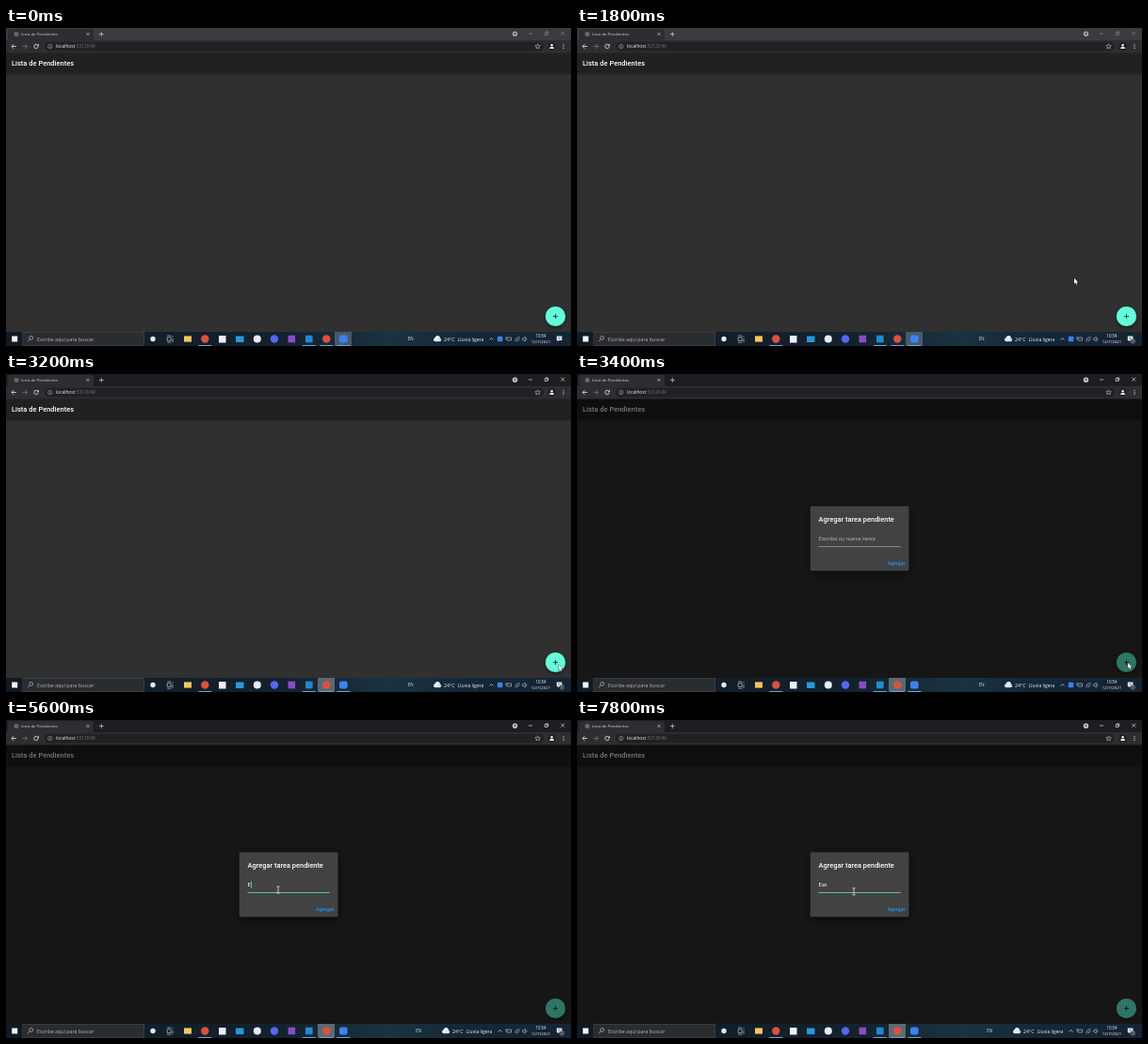
These frames come from a looping animation (600 by 338 pixels, 8000 ms). An HTML page with a canvas:

```html
<!DOCTYPE html>
<html lang="es">
<head>
<meta charset="utf-8">
<title>Lista de Pendientes</title>
<style>
html, body { margin: 0; width: 100%; height: 100%; overflow: hidden; background: #303030; }
canvas { display: block; width: 600px; height: 338px; }
</style>
</head>
<body>
<canvas id="stage"></canvas>
<script>
const W = 600, H = 338, LOOP = 8000, TICK = 200;
const UI = '"Open Sans", "Noto Sans", sans-serif';
const APP = 'Roboto, Arial, sans-serif';
const TEAL = '#64ffda';

const canvas = document.getElementById('stage');
const ctx = canvas.getContext('2d');
const dpr = window.devicePixelRatio || 1;
canvas.width = W * dpr;
canvas.height = H * dpr;

function rect(x, y, w, h, color) {
  ctx.fillStyle = color;
  ctx.fillRect(x, y, w, h);
}

function round(x, y, w, h, r, color) {
  ctx.fillStyle = color;
  ctx.beginPath();
  ctx.roundRect(x, y, w, h, r);
  ctx.fill();
}

function disc(x, y, r, color) {
  ctx.fillStyle = color;
  ctx.beginPath();
  ctx.arc(x, y, r, 0, 7);
  ctx.fill();
}

function ring(x, y, r, color, width = 0.7, from = 0, to = 7) {
  ctx.strokeStyle = color;
  ctx.lineWidth = width;
  ctx.beginPath();
  ctx.arc(x, y, r, from, to);
  ctx.stroke();
}

function path(d, color, width = 0.8) {
  const p = new Path2D(d);
  if (width) {
    ctx.strokeStyle = color;
    ctx.lineWidth = width;
    ctx.stroke(p);
  } else {
    ctx.fillStyle = color;
    ctx.fill(p);
  }
}

function text(s, x, y, size, color, font = UI, weight = 400, align = 'left') {
  ctx.font = `${weight} ${size}px ${font}`;
  ctx.textAlign = align;
  ctx.fillStyle = color;
  ctx.fillText(s, x, y);
}

function at(x, y, draw) {
  ctx.save();
  ctx.translate(x, y);
  draw();
  ctx.restore();
}

function drawBrowser(focused) {
  const bar = '#2e2e32';
  rect(0, 0, W, 14, focused ? '#1e1e22' : '#3b3c41');
  round(2, 1, 91, 14, [3, 3, 0, 0], bar);
  rect(0, 13, W, 13.5, bar);

  disc(11, 6.5, 2.5, '#66686c');
  text('Lista de Pendientes', 16, 8, 4.3, '#d4d5d8');
  path('M85.5 5l3 3m0-3l-3 3', '#d8d8d8', 0.6);
  path('M98.8 6.5h5M101.3 4v5', '#d0d0d0', 0.7);

  disc(540.5, 6.3, 2.7, focused ? '#c4c6c9' : '#a4a6a9');
  path('M539.2 5.6h2.6l-1.3 1.7z', '#242428', 0);
  const ctl = focused ? '#f0f0f0' : '#85868a';
  path('M555 6h4M572.2 4.8h2.7v2.7h-2.7zM573 4.6V4h2.7v2.7h-.7M589.3 3.8l3.8 3.8m0-3.8l-3.8 3.8', ctl, 0.65);

  path('M11 19.5H6M8.3 17.1L5.9 19.5l2.4 2.4', '#e6e6e8');
  path('M17.5 19.5h5M20.2 17.1l2.4 2.4-2.4 2.4', '#77787c');
  ring(32, 19.5, 2.2, '#e6e6e8', 0.8, 0.2, 5.5);
  path('M34.8 16.8v2.4h-2.4z', '#e6e6e8', 0);

  round(41, 14.7, 530, 9.8, 4.9, '#202124');
  ring(46.8, 19.5, 2.2, '#a5a7ab', 0.6);
  path('M46.8 18.1v.5M46.8 19.1v1.7', '#c4c6c9', 0.6);
  text('localhost', 53, 21.2, 4.85, '#f1f1f2');
  text(':53120/#/', 73.5, 21.2, 4.85, '#74767b');
  path('M564.6 16.8l.75 1.8 2 .15-1.5 1.25.45 1.9-1.7-1-1.7 1 .45-1.9-1.5-1.25 2-.15z', '#d0d1d3', 0.55);
  disc(579.6, 19.5, 4, '#1d1e21');
  disc(579.6, 18.2, 1.3, '#f0f0f0');
  path('M577.2 22.1v-.7q0-1.3 2.4-1.3t2.4 1.3v.7z', '#f0f0f0', 0);
  for (const y of [17.6, 19.5, 21.4]) disc(592, y, 0.55, '#e6e6e8');
}

function drawApp() {
  rect(0, 26, W, 297, '#303030');
  const shade = ctx.createLinearGradient(0, 48, 0, 51);
  shade.addColorStop(0, 'rgba(0,0,0,.3)');
  shade.addColorStop(1, 'rgba(0,0,0,0)');
  rect(0, 48, W, 3, shade);
  rect(0, 26, W, 22, '#212121');
  text('Lista de Pendientes', 6, 40.2, 7.5, '#fff', APP, 500);
  ctx.save();
  ctx.shadowColor = 'rgba(0,0,0,.45)';
  ctx.shadowBlur = 4 * dpr;
  ctx.shadowOffsetY = 1.5 * dpr;
  disc(583.5, 306.5, 10.6, TEAL);
  ctx.restore();
  path('M580.9 306.5h5.2M583.5 303.9v5.2', '#10201c', 0.8);
}

function caretOn(t) {
  if (t < 4800) return false;
  return t < 5000 || (t >= 5400 && t < 6600) || (t >= 7000 && t < 7200);
}

function drawDialog(t) {
  rect(0, 26, W, 297, 'rgba(0,0,0,.54)');
  ctx.save();
  ctx.shadowColor = 'rgba(0,0,0,.6)';
  ctx.shadowBlur = 10 * dpr;
  ctx.shadowOffsetY = 3 * dpr;
  round(247.7, 140.5, 104.8, 68.7, 1.5, '#424242');
  ctx.restore();

  text('Agregar tarea pendiente', 256.5, 156.7, 7.45, '#fff', APP, 500);

  const typed = t < 5400 ? '' : t < 6000 ? 'E' : 'Eat';
  const hint = t < 5400 ? 1 : t < 5600 ? 0.25 : 0;
  if (hint) {
    ctx.globalAlpha = hint;
    text('Escriba su nueva tarea', 256.5, 177.1, 6, '#b0b0b0', APP);
    ctx.globalAlpha = 1;
  }
  text(typed, 256.5, 177.1, 6, '#fff', APP);
  if (caretOn(t)) rect(256.6 + ctx.measureText(typed).width, 171.5, 0.75, 7.6, '#64d8e8');

  const focus = t >= 4600;
  rect(256.5, 183.2, 87.2, focus ? 0.8 : 0.6, focus ? '#64dcd8' : '#b4b4b4');
  text('Agregar', 329.6, 202.8, 5.25, '#2196f3', APP, 500);
}

function drawTaskbar(focused, t) {
  const bg = ctx.createLinearGradient(0, 0, W, 0);
  bg.addColorStop(0, '#101a24');
  bg.addColorStop(0.5, '#14222e');
  bg.addColorStop(0.68, '#1a3341');
  bg.addColorStop(0.8, '#142838');
  bg.addColorStop(1, '#152433');
  rect(0, 323, W, 15, bg);

  rect(6.2, 327.5, 6, 6, '#f4f4f4');
  rect(17.5, 323, 129.5, 15, '#4a4d50');
  rect(18, 323.5, 128.5, 14, '#2a2d30');
  ring(26.7, 329.4, 1.9, '#d5d6d7', 0.6);
  path('M25.3 330.8l-2.2 2.4', '#d5d6d7', 0.6);
  text('Escribe aquí para buscar', 33, 332.5, 5.3, '#b6b8ba');

  rect(focused ? 331 : 349, 323, 18, 15, focused ? '#5b6972' : '#485a69');

  disc(156, 330.5, 2.7, '#e4e8ec');
  path('M171.2 328.8h4v3.6h-4zM171.2 327h4M171.2 334.2h4M177 327v1.4M177 330v4.2', '#d8dde1', 0.6);
  rect(189, 327.4, 8, 6.2, '#f2c75c');
  disc(211.3, 330.5, 4.2, '#db5141');
  rect(226, 327, 7.5, 7.5, '#eef0f1');
  rect(244, 327.5, 8.5, 6.5, '#2a96e0');
  disc(266.8, 330.5, 4, '#e9edef');
  disc(285, 330.5, 4.2, '#5865f2');
  rect(299.5, 326.7, 7.6, 7.6, '#8a4bc4');
  rect(318, 326.7, 7.6, 7.6, '#2488d0');
  disc(340.3, 330.5, 4.2, '#db5141');
  round(354, 326.4, 8.6, 8.2, 2, '#3c82f0');
  for (const x of [211.3, 321.8, 340.3, 358.3]) rect(x - 7, 337, 14, 1, '#6aa9d6');

  const late = t >= 4200;
  at(late ? 9 : 0, 0, () => {
    text('EN', late ? 426.3 : 426.8, 331.6, 4.4, '#dfe3e6');
    disc(456, 331.2, 2, '#dce6ee');
    disc(458.3, 329.7, 2.6, '#eef3f7');
    disc(460.4, 331.4, 1.8, '#cfdbe5');
    rect(456, 331, 4.5, 2.2, '#dce6ee');
    text('24°C', 465, 332.5, 5.3, '#f1f3f4');
    text('Lluvia ligera', 479.7, 332.5, 5, '#f1f3f4');
    path('M513.5 331.5l2-2 2 2', '#e3e7ea', 0.7);
  });
  if (!late) round(521.8, 327.8, 5.6, 5.4, 1.2, '#3c82f0');

  const tray = '#d9dfe3';
  path('M532 329h4.5v3h-4.5zM531 328v3', tray, 0.55);
  path('M541 333.2q0-4.5 4.5-4.5M543 333.2q0-2.5 2.5-2.5', tray, 0.6);
  path('M548.5 329.7h1.2l1.6-1.5v5l-1.6-1.5h-1.2z', tray, 0.5);
  path('M552.4 329.2q1.2 1.4 0 2.8', tray, 0.5);
  text('10:54', 568, 328.6, 4.4, '#f1f3f4', UI, 400, 'center');
  text('12/7/2021', 568, 335.4, 4.3, '#f1f3f4', UI, 400, 'center');
  path('M584.8 327.5h5.6v4.6h-3.2l-1.3 1.5v-1.5h-1.1z', '#eef1f3', 0);
  path('M586 329h3.2M586 330.4h3.2', '#20303d', 0.4);
  if (t >= 200) {
    disc(590.3, 332.9, 2.4, '#26333f');
    ring(590.3, 332.9, 2.4, '#b8c2c9', 0.4);
    text('2', 590.3, 334.3, 3.8, '#fff', UI, 400, 'center');
  }
}

// [time, x, y]
const moves = [
  [1800, 528, 266], [2200, 551, 284], [2800, 586, 308], [3200, 587, 309],
  [3400, 585, 307], [3600, 510, 275], [4000, 308, 192], [4200, 289, 180.5],
  [7600, 289, 180.5], [7800, 294, 182.3], [8000, 294, 182.3]
];

function drawPointer(t) {
  if (t < moves[0][0]) return;
  const i = moves.findIndex(m => m[0] > t);
  const [t0, x0, y0] = moves[i - 1], [t1, x1, y1] = moves[i];
  const k = (t - t0) / (t1 - t0);
  at(x0 + (x1 - x0) * k, y0 + (y1 - y0) * k, () => {
    if (t >= 4200) {
      path('M-1.6-3.5H1.6M0-3.5V3.5M-1.6 3.5H1.6', '#e0e0e0', 0.8);
    } else {
      const arrow = 'M0 0V5.8L1.4 4.6 2.3 6.7 3.3 6.2 2.4 4.3H4.2Z';
      path(arrow, '#222', 0.7);
      path(arrow, '#fff', 0);
    }
  });
}

function draw(now) {
  const t = Math.floor((now % LOOP) / TICK) * TICK;
  const focused = t >= 3000;
  ctx.setTransform(dpr, 0, 0, dpr, 0, 0);
  drawApp();
  if (t >= 3400) drawDialog(t);
  drawBrowser(focused);
  drawTaskbar(focused, t);
  drawPointer(t);
}

const start = performance.now();
function loop() {
  draw(performance.now() - start);
  requestAnimationFrame(loop);
}
loop();
</script>
</body>
</html>
```
